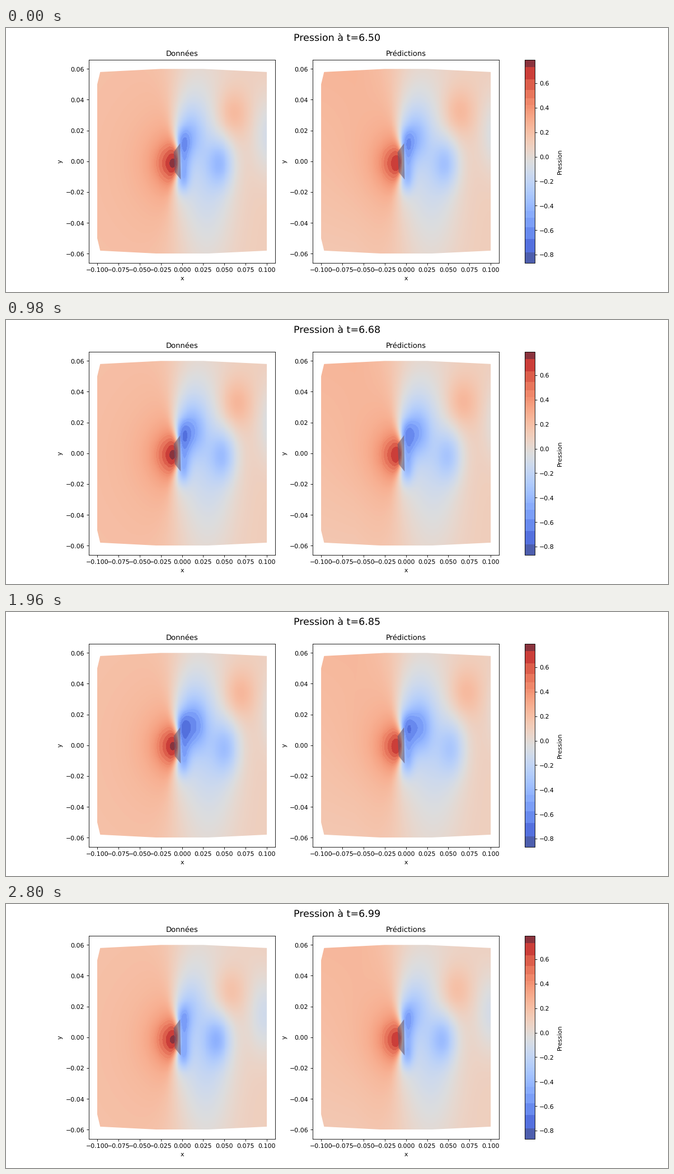
These frames come from a looping animation (1183 by 473 pixels, 2940 ms). A matplotlib script:

```python
import numpy as np
import matplotlib.pyplot as plt
from matplotlib.animation import FuncAnimation
from matplotlib.cm import ScalarMappable
from matplotlib.colors import ListedColormap, Normalize
from matplotlib.patches import Polygon

plt.rcParams['text.hinting'] = 'no_hinting'

W, H = 1183, 473
DPI = W / 15
N_FRAMES, STEP_MS = 21, 140
VMIN, VMAX = -0.868, 0.792
CYCLES_PER_FRAME = 0.14825          # vortex shedding rate

# Grid in centimetres
X, Y = np.meshgrid(np.linspace(-10, 10, 322), np.linspace(-6, 6, 340))


def gauss(x0, y0, sx, sy):
    return np.exp(-((X - x0) / sx) ** 2 / 2 - ((Y - y0) / sy) ** 2 / 2)


def wave(phase, shift=0.0):
    return np.cos(2 * np.pi * (phase - shift))


def smooth(a, lo, hi):
    t = np.clip((a - lo) / (hi - lo), 0, 1)
    return t * t * (3 - 2 * t)


def vortex(age, side):
    """Low-pressure core with a wide skirt, drifting downstream with age."""
    s = age - .55
    x = 1.2 + 5.5 * s + 4.2 * s * s
    y = .15 + 6 * (age - 1) ** 2
    rise = smooth(age, .35, .6)
    core = .31 * rise * (1 - .6 * max(age - .9, 0))
    skirt = .22 * rise * np.clip(1.6 - age, 0, .9)
    grown, late = smooth(age, .5, .9), smooth(age, .95, 1.35)
    return (-core * gauss(x, side * y, 1.05 + .25 * late, 1.05 + .75 * late)
            - skirt * gauss(.7 * x + .3, side * (y + 1.2 + .6 * grown),
                            2.0, 1.8 + grown))


def spot(age, side):
    """High-pressure patch travelling opposite a vortex."""
    x = 5.9 + 10.5 * age
    y = 3.5 - 10 * min(age - .22, 0) ** 2
    p = .19 * np.exp(-((age - .03) / .2) ** 2)
    return p * gauss(x, side * y, 1.4, 1.15)


def pressure(i, predicted):
    ph = i * CYCLES_PER_FRAME
    level = .15 + .04 * wave(2 * ph, .04)
    gain = .92 if predicted else 1.0

    # Upstream side: stagnation in front of the body
    d2 = (X + 1) ** 2 + (1.5 * (Y + .2 * wave(ph, .9))) ** 2
    front = level + .59 * gain / (1 + d2 / 2.9)
    if predicted:
        front = front + .05 * wave(ph) * Y / 6 * np.clip(-X / 6, 0, 1)

    # Downstream side: wake, low pressure behind the body, vortices
    lag = ph + (.025 if predicted else 0)
    wake = -.17 * (1 - .35 * wave(2 * ph)) * gauss(1.8, 0, 2.6, 2.2)
    wake -= .08 * np.exp(-((X - 1.8) / 2.8) ** 2 / 2)
    wake -= .3 * gauss(.1, 0, .65, 1.1)
    for side, shift in ((-1, 0), (1, .5)):
        tip = .2 * (1 - side * .4 * wave(ph, .75))
        wake -= tip * gauss(.05, side * 1.25, .6, .6)
        age = (lag + shift) % 1
        for a in (age, age + 1):
            wake += vortex(a, side) + spot(a - 1, -side)
    back = .06 + 1.3 * (level - .15) + gain * wake

    # The front bends upstream and softens away from the body
    far = np.abs(Y)
    x0 = -.45 - .8 * (1 - np.exp(-(far / 1.5) ** 2))
    width = .2 + .12 * far + .035 * far ** 2
    blend = .5 * (1 - np.tanh((X - x0) / width))
    return blend * front + (1 - blend) * back


def banded_map():
    """Smooth in the middle, flat bands that widen towards both ends."""
    vals = np.linspace(VMIN, VMAX, 256)
    rgb = plt.get_cmap('coolwarm')(np.linspace(0, 1, 256))[:, :3]
    high = .4 + .335 * (np.arange(6) / 5) ** 1.6
    low = -.45 - .335 * (np.arange(5) / 4) ** 1.4
    for edges in (high, low[::-1]):
        for a, b in zip(edges, edges[1:]):
            sel = (vals >= a) & (vals < b)
            rgb[sel] = rgb[sel].mean(axis=0)
    rgb[vals >= high[-1]] = (.54, .2, .24)
    rgb[vals < low[-1]] = (.3, .37, .68)
    return ListedColormap(rgb)


cmap = banded_map()
norm = Normalize(VMIN, VMAX)
fig, axes = plt.subplots(1, 2, figsize=(15, (H + .001) / DPI), dpi=DPI)
bar = fig.colorbar(ScalarMappable(norm, cmap), ax=list(axes), label='Pression')
bar.set_ticks(np.arange(-4, 4) * .2)
heading = fig.suptitle('', fontsize=16)

half = [(-.1, .05), (-.0965, .058), (-.025, .06), (.025, .06), (.1, .058)]
outline = half + [(x, -y) for x, y in reversed(half)]
body = [(-.0098, .006), (-.0022, .0117), (-.0015, -.0118), (-.0085, -.007)]

images = []
for ax, name in zip(axes, ('Données', 'Prédictions')):
    im = ax.imshow(np.zeros_like(X), origin='lower', aspect='auto', norm=norm,
                   cmap=cmap, extent=(-.1, .1, -.06, .06),
                   interpolation='nearest')
    edge = Polygon(outline, fc='none', ec='none')
    ax.add_patch(edge)
    im.set_clip_path(edge)
    ax.add_patch(Polygon(body, fc=(.42, .35, .43), ec='none', alpha=.6))
    ax.set(title=name, xlabel='x', ylabel='y', xlim=(-.11, .11), ylim=(-.066, .066))
    ax.set_xticks(np.arange(-4, 5) * .025)
    ax.set_yticks(np.arange(-3, 4) * .02)
    images.append(im)


def draw(i):
    for im, predicted in zip(images, (False, True)):
        im.set_data(pressure(i, predicted))
    heading.set_text(f'Pression à t={6.504 + .0245 * i:.2f}')
    return images


anim = FuncAnimation(fig, draw, frames=N_FRAMES, interval=STEP_MS,
                     init_func=lambda: draw(0), repeat=True, repeat_delay=0)
plt.show()
```
